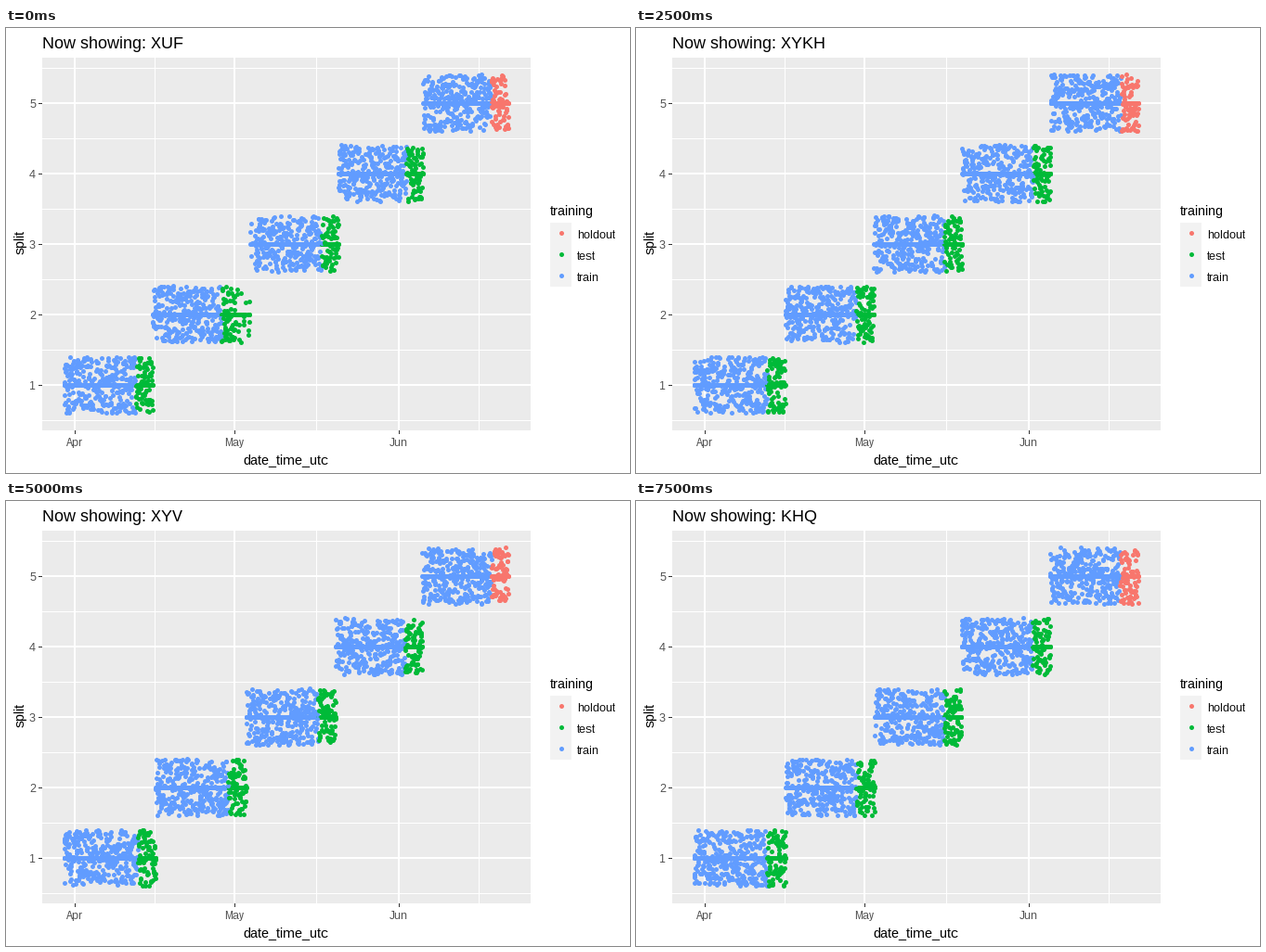
Animation of 672x480 px, one loop 8 s. Source, as a matplotlib script:

```python
import numpy as np
import matplotlib.pyplot as plt
from matplotlib.animation import FuncAnimation
from matplotlib.patches import Rectangle

plt.rcParams.update({
    "font.family": "Liberation Sans",
    "text.hinting": "native",
    "text.hinting_factor": 1,
})

W, H, DPI = 672, 480, 96
LEFT, TOP, RIGHT, BOTTOM = 39, 32, 565, 434
FIRST, LAST = 63, 541     # x range of the observations
DAY = 5.72                # pixels per day
ROW = 76.1                # pixels per split
JITTER = 0.4 * ROW
HOLDOUT, TEST, TRAIN = "#F8766D", "#00BA38", "#619CFF"

CODES = ["XUF", "XHV", "XYKH", "XDQK", "XZK", "XYV", "KQJ", "KHQ"]
GAPS = {0: (247, 268), 2: (405, 420)}   # outages: data set -> x range


def row_y(split):
    return 385.5 - ROW * (split - 1)


def build(k):
    """Hourly data with some hours missing, cut into five equal splits
    whose last fifth is held back for testing."""
    rng = np.random.default_rng(40 + k)
    x = np.arange(FIRST, LAST + 0.5, DAY / 24)
    keep = np.linspace(0.90, 0.96, x.size)
    if k in GAPS:
        lo, hi = GAPS[k]
        keep[(x > lo) & (x < hi)] = 0.15
    splits = np.array_split(x[rng.random(x.size) < keep], 5)

    colors = []
    for i, part in enumerate(splits):
        n_train = int(0.8 * part.size)
        held = HOLDOUT if i == 4 else TEST
        colors += [TRAIN] * n_train + [held] * (part.size - n_train)
    x = np.concatenate(splits)
    y = np.repeat([row_y(s) for s in range(1, 6)], [p.size for p in splits])
    spread = y + rng.uniform(-JITTER, JITTER, y.size)
    pts = np.column_stack([np.tile(x, 2), np.concatenate([y, spread])])
    return np.floor(pts) + 0.5, colors * 2


fig = plt.figure(figsize=(W / DPI, H / DPI), dpi=DPI, facecolor="white")
ax = fig.add_axes([0, 0, 1, 1])
ax.set_xlim(0, W)
ax.set_ylim(H, 0)
ax.axis("off")


def box(x, y, w, h, color="white"):
    ax.add_patch(Rectangle((x, y), w, h, fc=color, lw=0, zorder=1))


def label(x, y, s, px=12, color="black", **kw):
    return ax.text(x, y, s, fontsize=px * 0.75, color=color,
                   va="baseline", **kw)


def dots(pts, colors):
    return ax.scatter(pts[:, 0], pts[:, 1], s=3.75 ** 2, c=colors,
                      linewidths=0, zorder=3)


# Panel, grid and axes
box(LEFT, TOP, RIGHT - LEFT, BOTTOM - TOP, "#EBEBEB")
for half in range(1, 12):
    y = int(row_y(half / 2))
    if half % 2:
        box(LEFT, y, RIGHT - LEFT, 1)
    else:
        box(LEFT, y - 1, RIGHT - LEFT, 2)
        box(LEFT - 4, y, 4, 1, "#333333")
        label(32, y + 5, str(half // 2), color="#4D4D4D", ha="right")
for x in (160, 334, 509):
    box(x, TOP, 1, BOTTOM - TOP)
for x, month in ((74, "Apr"), (246, "May"), (423, "Jun")):
    box(x - 1, TOP, 2, BOTTOM - TOP)
    box(x, BOTTOM, 1, 4, "#333333")
    label(x, 451, month, color="#4D4D4D", ha="center")
label(301, 470, "date_time_utc", 15, ha="center")
label(20, 231.5, "split", 15, ha="center", rotation=90,
      rotation_mode="anchor")

# Legend
label(586, 202, "training", 15)
box(586, 210, 23, 69, "#F2F2F2")
for i, name in enumerate(("holdout", "test", "train")):
    label(615, 227 + 23 * i, name)
dots(np.array([[598.5, 221.5 + 23 * i] for i in range(3)]),
     [HOLDOUT, TEST, TRAIN])

title = label(39, 22, "", 18)
data = [build(k) for k in range(len(CODES) + 1)]
cloud = dots(*data[0])


def update(i):
    # The points switch half a step before the title does
    pts, colors = data[(i + 1) // 2]
    cloud.set_offsets(pts)
    cloud.set_facecolor(colors)
    title.set_text("Now showing: " + CODES[i // 2])
    return cloud, title


anim = FuncAnimation(fig, update, frames=16, interval=500,
                     repeat=True, repeat_delay=0, blit=False)
plt.show()
```
